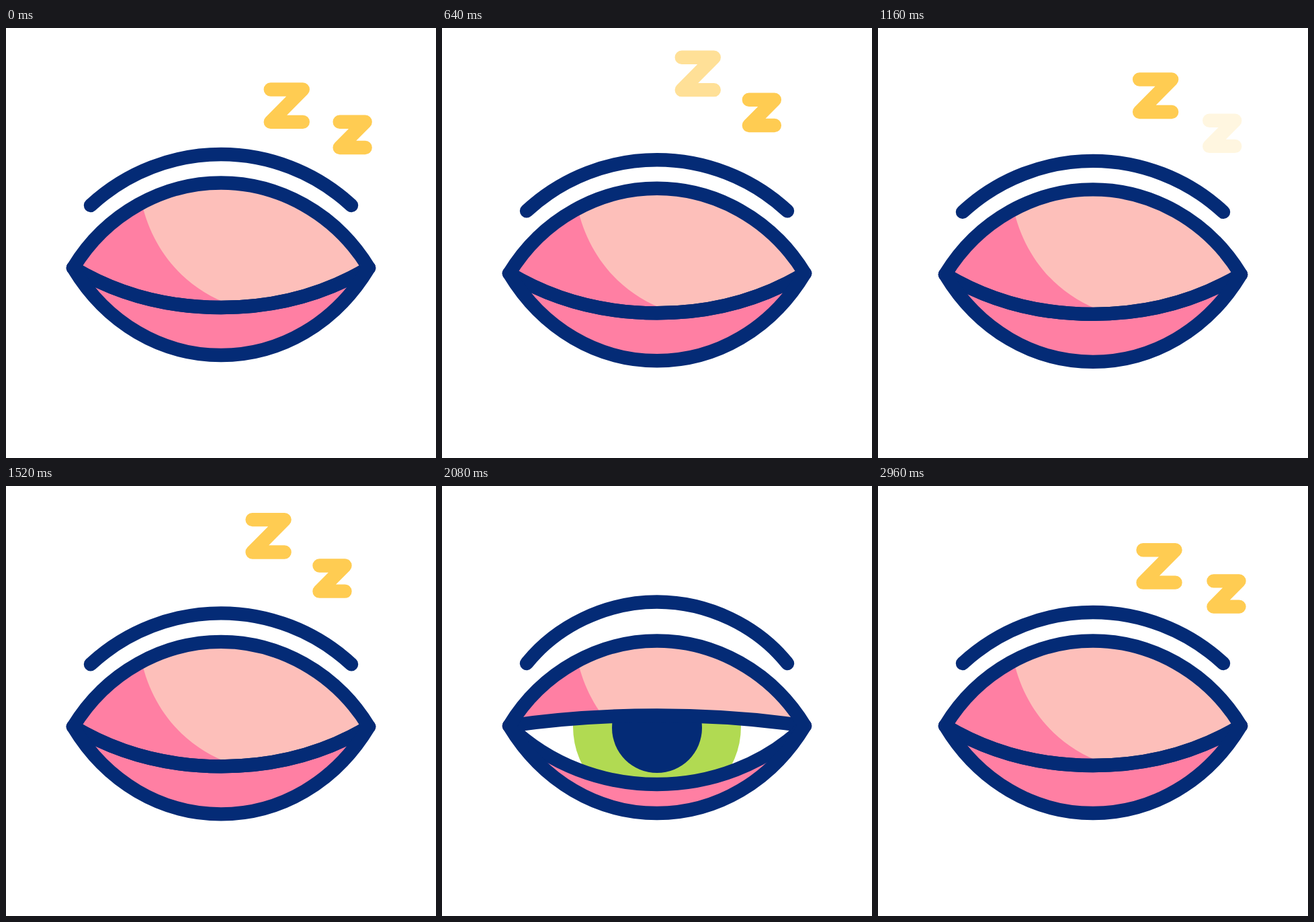
Write an HTML page that moves like this. It is 640x640 px and loops after 3000 ms.

```html
<!DOCTYPE html>
<html lang="en">
<head>
<meta charset="utf-8">
<title>Sleepy eye</title>
<style>
  html, body { margin: 0; height: 100%; overflow: hidden; background: #fff; }
  svg { display: block; width: 100%; height: 100%; }
  .line { fill: none; stroke: #042b76; stroke-width: 20.4; stroke-linecap: round; stroke-linejoin: round; }
  .z { fill: none; stroke: #ffcc52; stroke-width: 20.4; stroke-linecap: round; stroke-linejoin: round; }
</style>
</head>
<body>
<svg viewBox="0 0 640 640">
  <defs>
    <clipPath id="lidClip"><path id="lidArea"/></clipPath>
    <clipPath id="gapClip"><path id="gapArea"/></clipPath>
    <path id="track1" d="M387 117C386 98 386 84 379 66.5C374 55 365 47 356.5 40C350 35 343 31.5 335 28"/>
    <path id="track2" d="M508 140C500 137 491 132.5 483 127.5C473 121 463 115 456.5 108.5C448 100 443 92 440 82C438.5 77 438 74 437.5 70"/>
  </defs>
  <g id="eye">
    <path id="almond" fill="#ff7fa3"/>
    <g clip-path="url(#lidClip)">
      <path fill="#fdbfba" d="M200 250C212 318 255 380 325 408L340 420H545V215H200Z"/>
    </g>
    <g clip-path="url(#gapClip)">
      <path fill="#fff" d="M90 300H550V500H90Z"/>
      <circle cx="320" cy="358" r="125" fill="#b1da52"/>
      <circle cx="320" cy="360" r="67" fill="#042b76"/>
    </g>
    <path id="upperLid" class="line"/>
    <path id="lowerLid" class="line"/>
    <path id="outline" class="line"/>
    <path id="brow" class="line"/>
  </g>
  <path id="z1" class="z" d="M10.2 10.2h48l-48 48.4h48"/>
  <path id="z2" class="z" d="M10.2 10.2h38l-38 38.2h38"/>
</svg>
<script>
const LOOP = 3000, STEP = 40;
const $ = id => document.getElementById(id);
const set = (id, d) => $(id).setAttribute('d', d);

const ramp = (t, from, to) => Math.min(1, Math.max(0, (t - from) / (to - from)));
const ease = (t, from, to) => { const s = ramp(t, from, to); return s * s * (3 - 2 * s); };
const mix = (a, b, k) => a.map((v, i) => v + (b[i] - v) * k);

// Symmetric arc about x = 320, given as [startX, startY, c1x, c1y, c2x, peakY].
function arc([x, y, ax, ay, bx, top], reversed = false) {
  const m = v => 640 - v;
  return reversed
    ? `L${m(x)} ${y}C${m(ax)} ${ay} ${m(bx)} ${top} 320 ${top}S${ax} ${ay} ${x} ${y}`
    : `M${x} ${y}C${ax} ${ay} ${bx} ${top} 320 ${top}S${m(ax)} ${ay} ${m(x)} ${y}`;
}
const area = (a, b) => arc(a) + arc(b, true) + 'Z';

const TOP = [100, 357, 150, 275, 235, 230.5];
const BOTTOM = [100, 357, 150, 440, 232, 487];
const LID_SHUT = [100, 357, 165, 396, 240, 416];
const UPPER_OPEN = [100, 357, 175, 346, 250, 341.5];
const LOWER_OPEN = [100, 357, 160, 415, 240, 444];
const BROW_REST = [126, 264, 180, 214, 250, 188];
const BROW_UP = [126, 264, 170, 209, 243, 172.5];

set('almond', area(TOP, BOTTOM));
set('outline', area(TOP, BOTTOM));

// Each flight: start time, px per ms, fade in (from, to), fade out (from, to).
const FLIGHTS = {
  1: [[-369, .0975, -369, -210, 560, 760], [631, .0975, 940, 1140, 1560, 1760]],
  2: [[-294, .0815, -294, -140, 740, 940], [855, .0917, 1125, 1325, 1740, 1940]]
};

function drawZ(n, t) {
  const time = t > 2500 ? t - LOOP : t;
  const flight = FLIGHTS[n].find(f => time < f[5]);
  const z = $('z' + n);
  if (!flight) return z.setAttribute('opacity', 0);
  const [start, speed, in0, in1, out0, out1] = flight;
  const p = $('track' + n).getPointAtLength(Math.max(0, time - start) * speed);
  z.setAttribute('transform', `translate(${p.x} ${p.y})`);
  z.setAttribute('opacity', ramp(time, in0, in1) * (1 - ramp(time, out0, out1)));
}

function draw(t) {
  const open = ease(t, 1667, 2067) - ease(t, 2467, 2867);
  const drop = 12.8 * (ease(t, 200, 933) - ease(t, 933, 1667));
  const upper = mix(LID_SHUT, UPPER_OPEN, open);
  const lower = mix(LID_SHUT, LOWER_OPEN, open);
  $('eye').setAttribute('transform', `translate(0 ${drop})`);
  set('lidArea', area(TOP, upper));
  set('gapArea', area(upper, lower));
  set('upperLid', arc(upper));
  set('lowerLid', arc(lower));
  set('brow', arc(mix(BROW_REST, BROW_UP, open)));
  drawZ(1, t);
  drawZ(2, t);
}

const began = performance.now();
function tick() {
  const t = (performance.now() - began) % LOOP;
  draw(Math.floor(t / STEP) * STEP);
  requestAnimationFrame(tick);
}
tick();
</script>
</body>
</html>
```
